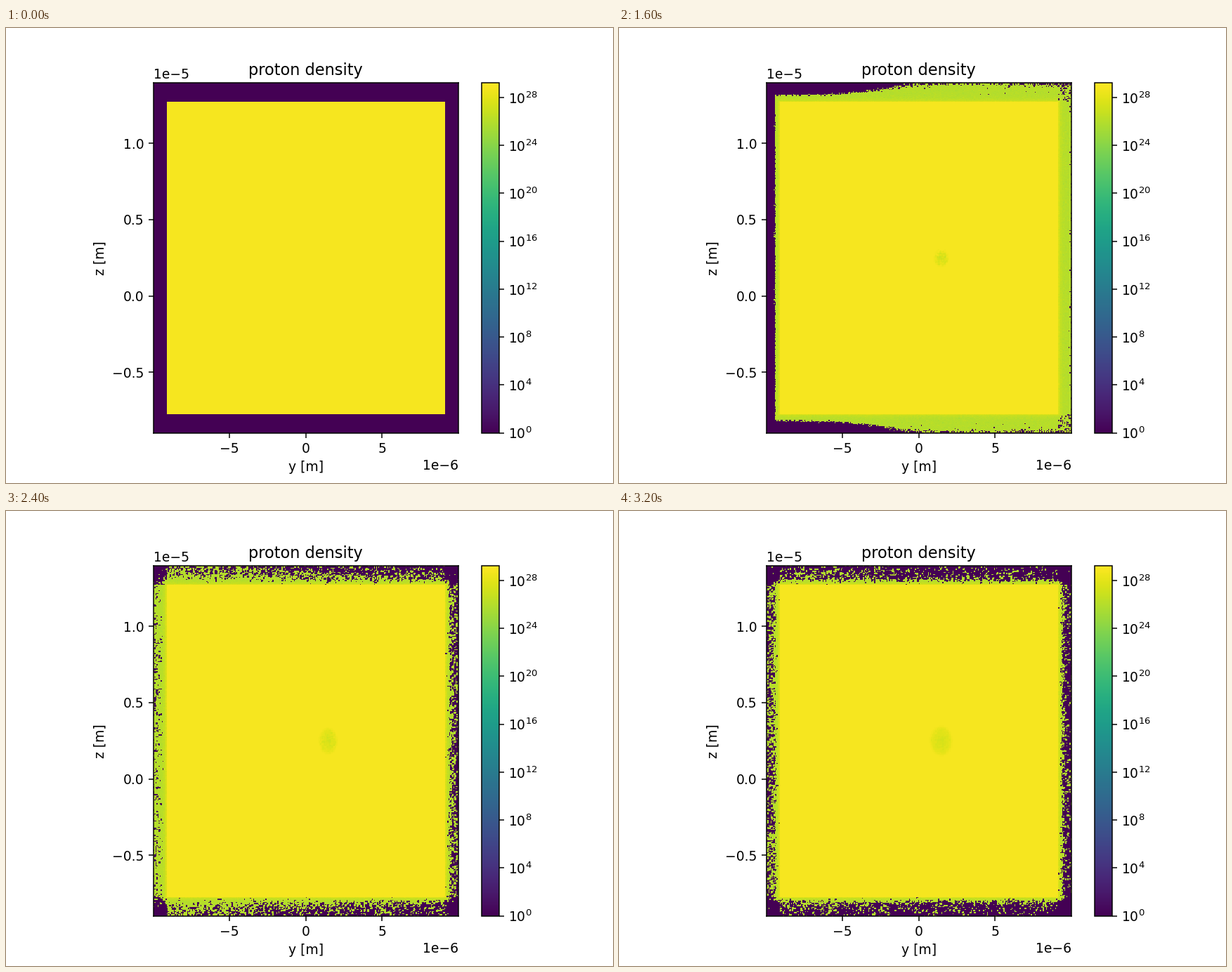
Write a matplotlib script that moves like this. It is 864 px wide and 648 px high and loops after 3.3 s.

```python
import numpy as np
import matplotlib.pyplot as plt
from matplotlib.animation import FuncAnimation
from matplotlib.cm import ScalarMappable
from matplotlib.colors import LogNorm

plt.rcParams["font.family"] = "DejaVu Sans"

FRAMES, INTERVAL = 33, 100
NX, NZ = 300, 345            # grid cells
PAD_X, PAD_Z = 13, 19        # vacuum cells around the slab
CELL = 433.8 / NX            # pixels per cell
LOG_MAX, LOG_SLAB, LOG_HALO = 29.23, 28.8, 26.0

ix, iz = np.meshgrid(np.arange(NX), np.arange(NZ))
px, pz = (ix + 0.5) * CELL, (iz + 0.5) * CELL


def outside(index, pad, size):
    """Distance in pixels beyond the slab along one axis, 0 inside."""
    cells = np.maximum(pad - index, index - (size - pad - 1))
    return np.where(cells > 0, (cells - 0.5) * CELL, 0)


dx, dz = outside(ix, PAD_X, NX), outside(iz, PAD_Z, NZ)
dist = np.hypot(dx, dz)
corner = (dx > 0) & (dz > 0)
slab = dist == 0

# Frame at which the expansion starts at each place
start_side = np.where(ix < NX // 2, 13.5, 11.1)
start_end = np.interp(px, [18, 90, 140, 190, 220, 290, 390, 433],
                      [12.9, 12.6, 11.9, 10.7, 10.2, 10.0, 10.35, 10.2])
start = np.where(dz > 0, start_end, start_side)
richness = np.interp(px, [0, NX * CELL], [1.5, 0.55])


def front(i, begin):
    return 0.9 * min(i / 6, 1) + 26 * (np.clip(i - begin, 0, None) / 6) ** 1.7


def clumped(noise):
    return noise + 0.5 * (np.roll(noise, 1, 0) + np.roll(noise, 1, 1))


def to_uniform(values):
    ranks = np.empty(values.size)
    ranks[np.argsort(values, axis=None)] = np.arange(values.size) / values.size
    return ranks.reshape(values.shape)


def cavity(i, noise):
    """Change of the log density around the heated spot."""
    if i < 10:
        return np.zeros_like(px)
    times = [10, 12, 16, 20, 24, 28, 32]
    rx = np.interp(i, times, [3, 7, 10, 11, 12.5, 14, 15])
    rz = np.interp(i, times, [3, 8, 11.5, 15, 17.5, 19, 20])
    x, z = px - 248.5, pz - 249.5
    r = np.hypot(x / rx, z / rz)
    depth = np.interp(i, [10, 12, 16], [0.1, 0.5, 1.0])
    speckle = np.interp(i, [12, 20, 28], [0.4, 0.25, 0.1])
    dip = depth * (0.8 + 0.6 * np.exp(-3 * r ** 2) + speckle * clumped(noise))
    dip /= 1 + np.exp((r - 0.97) * 14)
    wave = 15 + 2.5 * max(i - 12, 0)
    glow = 0.07 / (1 + np.exp((np.hypot(x - wave / 6, z) - wave) / 7))
    return glow - np.clip(dip, 0, 2)


def log_density(i):
    rng = np.random.default_rng(i if i >= 10 else 0)
    noise = rng.standard_normal((NZ, NX))
    jitter = 1 + 0.08 * rng.standard_normal((NZ, NX))
    reached = ((dx < front(i, start_side) * jitter)
               & (dz < front(i, start_end) * jitter))

    # Expected particles per cell: thins with age and distance
    age = np.maximum(i - start, 2)
    count = 2.6 * (6 / age) ** 2 * np.exp((18 - dist) / 14) * richness
    count += 4 * np.exp(-(age / 7) ** 4)
    count *= np.where(corner, 0.05 + 0.25 * np.exp(-max(i - 16, 0) / 2), 1)
    count += 4 * np.exp(-(dist / 4.5) ** 2)
    filled = reached & (to_uniform(clumped(noise)) < 1 - np.exp(-count))

    halo = LOG_HALO + 2 * np.exp(-dist / 2.5) + 0.15 * noise
    return np.where(slab, LOG_SLAB + cavity(i, noise),
                    np.where(filled, halo, 0))


fig, ax = plt.subplots(figsize=(6.4, 4.8), dpi=135)
image = ax.imshow(log_density(0), cmap="viridis", vmin=0, vmax=LOG_MAX,
                  extent=(-9.99e-6, 9.99e-6, -8.99e-6, 13.99e-6),
                  interpolation="nearest")
ax.set(title="proton density", xlabel="y [m]", ylabel="z [m]",
       xticks=[-5e-6, 0, 5e-6], yticks=[-5e-6, 0, 5e-6, 1e-5])
scale = ScalarMappable(LogNorm(1, 10 ** LOG_MAX), "viridis")
bar = fig.colorbar(scale, ax=ax, ticks=[10.0 ** k for k in range(0, 29, 4)])
bar.minorticks_off()


def update(i):
    image.set_data(log_density(i))
    return [image]


anim = FuncAnimation(fig, update, frames=FRAMES, interval=INTERVAL,
                     repeat=True, repeat_delay=0)
plt.show()
```
